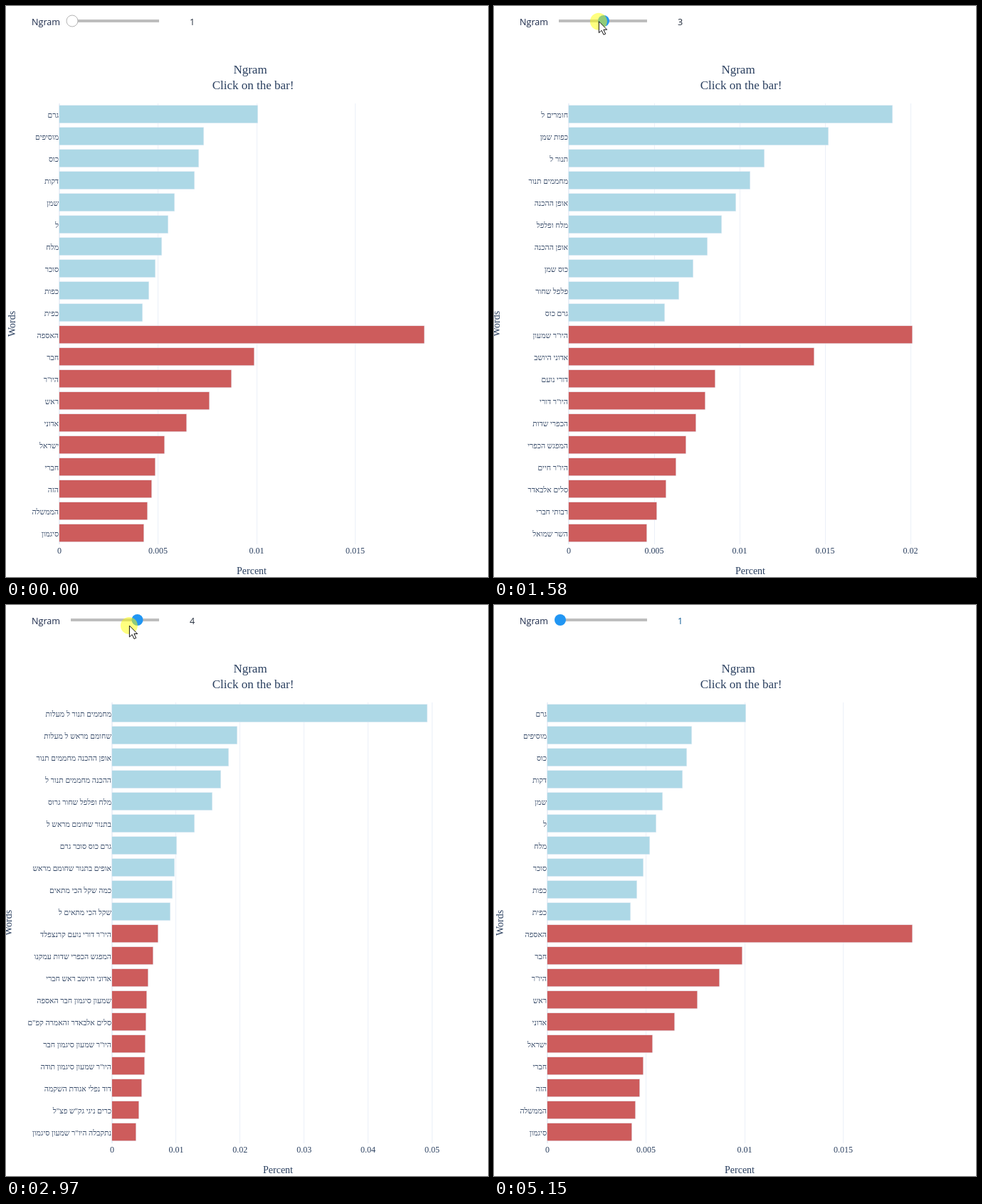
Recreate the animation shown at these times as an HTML page with a canvas. Size 677x803 px, loop 5820 ms.

```html
<!DOCTYPE html>
<html lang="en">
<head>
<meta charset="utf-8">
<title>Ngram chart</title>
<style>
html, body { margin: 0; width: 100%; height: 100%; overflow: hidden; background: #fff; }
canvas { display: block; }
</style>
</head>
<body>
<canvas id="stage" width="677" height="803"></canvas>
<script>
const ctx = document.getElementById('stage').getContext('2d');
const LOOP = 5820, CHART_DELAY = 165;
const TOP = 137, ROW = 31, RIGHT = 615;
const THUMB_LEFT = 93, THUMB_STEP = 30.5;
const SERIF = '"Liberation Serif", "Times New Roman", serif';
const SANS = '"Open Sans", "Noto Sans", sans-serif';
const INK = '#2a3f5f';

const words1 = `גרם|מוסיפים|כוס|דקות|שמן|ל|מלח|סוכר|כפות|כפית|האספה|חבר|היו"ר|ראש|אדוני|ישראל|חברי|הזה|הממשלה|סיגמון`.split('|');
const words3 = `חומרים ל מנות|כפות שמן זית|תנור ל מצלות|מחממים תנור ל|אופן ההכנה מחממים|מלח ופלפל שחור|אופן ההכנה מכינים|כוס שמן זית|פלפל שחור גרוס|גרם כוס סוכר|היו"ר שמעון סיגמון|אדוני היושב ראש|דורי נועם קרנצפלד|היו"ר דורי נועם|הכפרי שדות עמקנו|המפגש הכפרי שדות|היו"ר חיים זפן|סלים אלבאדר זהאמרה|רבותי חברי האספה|השר שמואל קזמא`.split('|');
const words4 = `מחממים תנור ל מעלות|שחומם מראש ל מעלות|אופן ההכנה מחממים תנור|ההכנה מחממים תנור ל|מלח ופלפל שחור גרוס|בתנור שחומם מראש ל|גרם כוס סוכר גרם|אופים בתנור שחומם מראש|כמה שקל הכי מתאים|שקל הכי מתאים ל|היו"ר דורי נועם קרנצפלד|המפגש הכפרי שדות עמקנו|אדוני היושב ראש חברי|שמעון סיגמון חבר האספה|סלים אלבאדר זהאמרה קפ"ם|היו"ר שמעון סיגמון חבר|היו"ר שמעון סיגמון תודה|דוד נפלי אגודת השקמה|כרים ניגי גק"ש פצ"ל|נתקבלה היו"ר שמעון סיגמון`.split('|');
const words2 = words3.map(w => w.split(' ').slice(0, 2).join(' '));
const words5 = words4.map((w, i) => `${w} ${words1[i]}`);

// blue, red: bar ends at a few ranks; the ranks between are interpolated
const charts = [
  { left: 75, step: 138.5, unit: .005, words: words1,
    blue: { 0: 354, 1: 277.5, 3: 265, 4: 236.5, 9: 192 },
    red: { 0: 588, 1: 348.5, 2: 317, 5: 223, 6: 210, 9: 194 } },
  { left: 105, step: 120, unit: .005, words: words2,
    blue: { 0: 560, 2: 380, 9: 240 },
    red: { 0: 588, 2: 311, 9: 215 } },
  { left: 125, step: 107.1, unit: .005, words: words3,
    blue: { 0: 571, 1: 438, 3: 418.5, 5: 279.5, 9: 257.5 },
    red: { 0: 590.5, 1: 484, 2: 230, 4: 211.5, 9: 204.5 } },
  { left: 149, step: 89.9, unit: .01, words: words4,
    blue: { 0: 591.5, 1: 325, 4: 290, 6: 239.5, 9: 230.5 },
    red: { 0: 214, 2: 199.5, 6: 194.5, 9: 182.5 } },
  { left: 178, step: 84, unit: .01, words: words5,
    blue: { 0: 591, 1: 400, 9: 248 },
    red: { 0: 236, 9: 200 } }
];

// time: pointer tip
const path = {
  270: [610, 795], 600: [222, 192], 830: [104, 40], 900: [104, 40], 1040: [97, 24], 1230: [97, 24],
  1450: [127, 21], 1970: [206, 24], 2390: [231, 26], 2690: [231, 26], 2790: [195, 28], 2970: [173, 29],
  3180: [150, 29], 3380: [150, 29], 3710: [131, 29], 4330: [94, 27], 4460: [94, 27],
  4530: [108, 53], 4900: [352, 640], 5130: [690, 765]
};

// Linear interpolation over an object of numeric keys
function lerpKeys(keys, at, pick = v => v) {
  const stops = Object.keys(keys).map(Number);
  const i = Math.max(1, stops.findIndex(s => s >= at));
  const a = stops[i - 1], b = stops[i];
  const from = pick(keys[a]), to = pick(keys[b]);
  return from + (to - from) * (at - a) / (b - a);
}

const pointerAt = t => [0, 1].map(axis => lerpKeys(path, t, p => p[axis]));

function valueAt(t) {
  if (t < 1040 || t > 4460) return 1;
  const value = Math.round((pointerAt(t)[0] - THUMB_LEFT) / THUMB_STEP) + 1;
  return Math.min(5, Math.max(1, value));
}

function text(str, x, y, size, align = 'center', family = SERIF, color = INK) {
  ctx.font = `${size}px ${family}`;
  ctx.textAlign = align;
  ctx.fillStyle = color;
  ctx.fillText(str, x, y);
}

function disc(x, y, r, color) {
  ctx.beginPath();
  ctx.arc(x, y, r, 0, Math.PI * 2);
  ctx.fillStyle = color;
  ctx.fill();
}

function drawSlider(t) {
  const value = valueAt(t);
  const idle = t < 960, hover = t < 1500;
  text('Ngram', 36, 27, 12.6, 'left', SANS, '#1a2848');
  text(value, 258, 27, 12.6, 'left', SANS, t > 4270 ? '#0b5a94' : '#26303f');
  ctx.fillStyle = '#bdbdbd';
  ctx.fillRect(91, 19, 124, 4);
  disc(THUMB_LEFT + (value - 1) * THUMB_STEP, 21, 8, idle ? '#fff' : hover ? '#888' : '#2196f3');
  if (idle) {
    ctx.strokeStyle = '#b5b5b5';
    ctx.lineWidth = 1;
    ctx.stroke();
  }
}

function drawAxes({ left, step, unit }, wordsX) {
  text('Ngram', 343, 95, 17);
  text('Click on the bar!', 347, 117, 17);
  for (let i = 0, x = left; x < RIGHT; x = left + ++i * step) {
    ctx.fillStyle = '#ebf0f8';
    ctx.fillRect(i ? Math.round(x - .5) : x - 1, TOP, i ? 1 : 2, ROW * 20);
    text(+(i * unit).toFixed(3), x, 770, 12);
  }
  text('Percent', (left + RIGHT) / 2, 799, 14);
  ctx.save();
  ctx.translate(wordsX, 447);
  ctx.rotate(-Math.PI / 2);
  text('Words', 0, 0, 14);
  ctx.restore();
}

function drawBars({ left, words, blue, red }) {
  ctx.strokeStyle = '#e5ecf6';
  ctx.lineWidth = .5;
  ctx.direction = 'rtl';
  words.forEach((word, i) => {
    const y = TOP + ROW * i;
    const end = lerpKeys(i < 10 ? blue : red, i % 10);
    const bar = [left - .25, y + 2.75, Math.round(end) - left, 25];
    ctx.fillStyle = i < 10 ? '#add8e6' : '#cd5c5c';
    ctx.fillRect(...bar);
    ctx.strokeRect(...bar);
    text(word, left - 1, y + 20, 10.7, 'right');
  });
  ctx.direction = 'ltr';
}

function drawPointer([x, y]) {
  disc(x, y, 12, 'rgba(255, 255, 0, .5)');
  ctx.save();
  ctx.translate(x + .5, y);
  const arrow = new Path2D('M0 0V16L3.8 12.6 6.6 18.6 9.3 17.4 6.5 11.5H11.3Z');
  ctx.fillStyle = '#fff';
  ctx.fill(arrow);
  ctx.strokeStyle = '#111';
  ctx.lineWidth = 1;
  ctx.stroke(arrow);
  ctx.restore();
}

function frame() {
  const t = performance.now() % LOOP;
  const n = valueAt(t - CHART_DELAY);
  const chart = charts[n - 1];
  ctx.fillStyle = '#fff';
  ctx.fillRect(0, 0, 677, 803);
  drawAxes(chart, n === 1 ? 13 : 8);
  drawBars(chart);
  drawSlider(t);
  if (t > 270 && t < 5130) drawPointer(pointerAt(t));
  requestAnimationFrame(frame);
}
frame();
</script>
</body>
</html>
```
